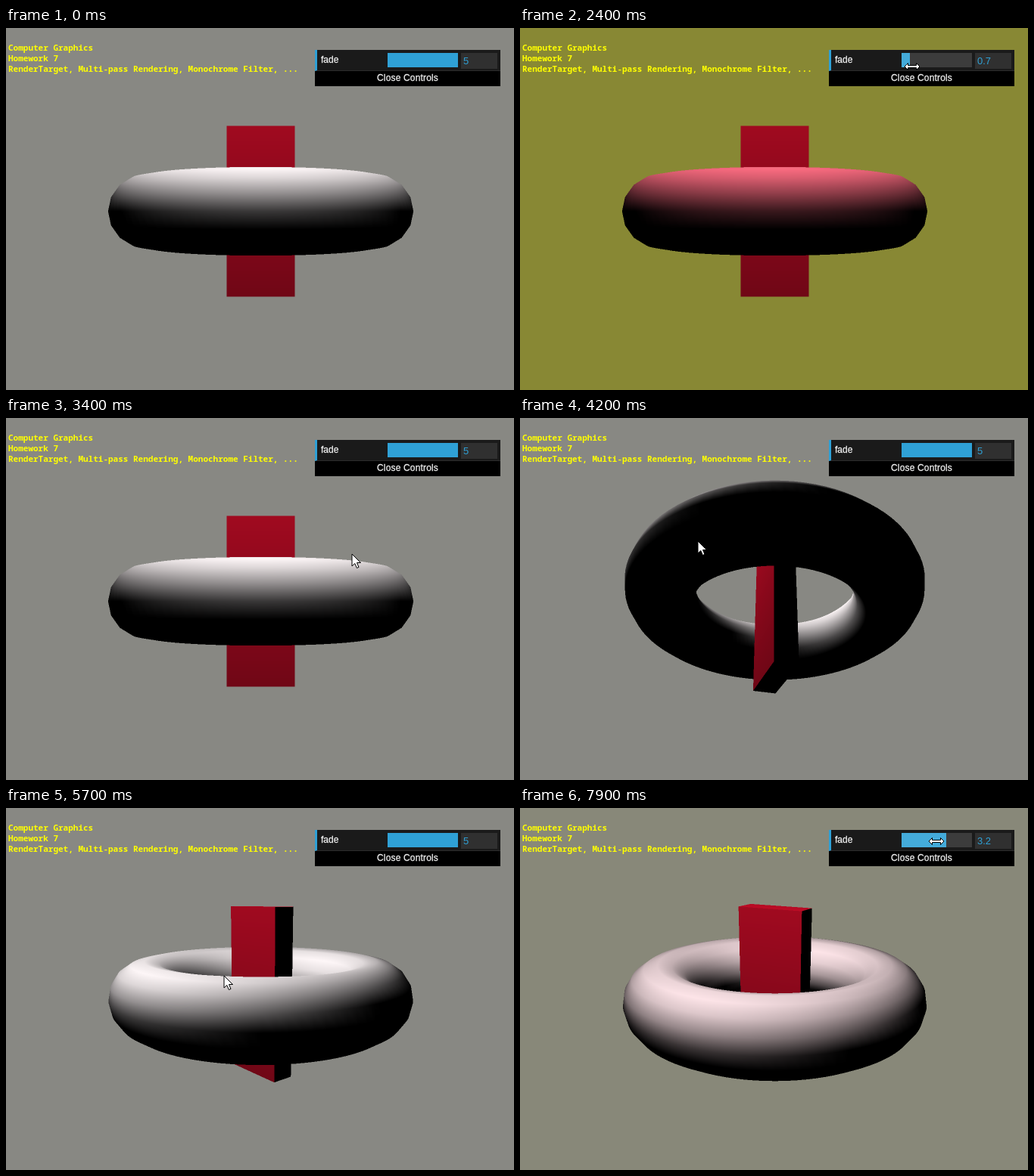
Animation, 671 px wide and 479 px high, one loop 8 s. Source, as an HTML page with a canvas:

```html
<!DOCTYPE html>
<html lang="en">
<head>
<meta charset="utf-8">
<title>Torus and box</title>
<style>
html, body { margin: 0; width: 100%; height: 100%; overflow: hidden; background: #888; }
#stage { position: relative; width: 671px; height: 479px; overflow: hidden; }
#stage * { position: absolute; box-sizing: border-box; }
#view { left: 0; top: 0; width: 671px; height: 479px; }
#info { left: 3px; top: 19px; margin: 0; color: #ff0; white-space: pre;
  font: 600 11px/14px "Noto Sans Mono", "DejaVu Sans Mono", monospace; }
#gui { left: 408px; top: 29px; width: 245px; height: 48px; background: #000; color: #eee;
  font: 12px/20px "Liberation Sans", Arial, sans-serif; -webkit-text-stroke: .3px; }
#row { left: 0; top: 0; width: 245px; height: 28px; background: #1a1a1a;
  border-left: 3px solid #2fa1d6; border-bottom: 1px solid #2c2c2c; }
#label { left: 5px; top: 3px; }
#slider { left: 93px; top: 4px; width: 93px; height: 19px; background: #303030; }
#fill { left: 0; top: 0; height: 19px; background: #2fa1d6; }
#slider.hover { background: #3c3c3c; }
.hover #fill { background: #44abda; }
#value { left: 190px; top: 4px; width: 48px; height: 21px; padding-left: 3px;
  background: #303030; color: #2fa1d6; font-size: 13px; line-height: 21px; -webkit-text-stroke: 0; }
#close { left: 0; top: 27px; width: 245px; text-align: center; letter-spacing: .17px; }
#mouse { left: 0; top: 0; width: 1px; height: 1px; overflow: visible; }
</style>
</head>
<body>
<div id="stage">
  <canvas id="view"></canvas>
  <pre id="info">Computer Graphics
Homework 7
RenderTarget, Multi-pass Rendering, Monochrome Filter, ...</pre>
  <div id="gui">
    <div id="row">
      <span id="label">fade</span>
      <div id="slider"><div id="fill"></div></div>
      <div id="value">5</div>
    </div>
    <div id="close">Close Controls</div>
  </div>
  <svg id="mouse" fill="#fff" stroke="#000">
    <path id="arrow" d="M0 0V16L3.8 12.5L6.4 18.5L9 17.4L6.5 11.5H11.5Z"/>
    <path id="resize" d="M-10 0L-5.5 -4.5V-1.5H5.5V-4.5L10 0L5.5 4.5V1.5H-5.5V4.5Z"/>
  </svg>
</div>
<script>
const SS = 2, W = 671 * SS, H = 479 * SS;
const CX = 336.5 * SS, CY = 242.5 * SS, FOCAL = 587 * SS, DIST = 40;
const LIGHT = [0, 30, 20], RED = [250, 16, 50];
const LOOP = 8000, STEP = 100;
const SLIDER = { x: 504, width: 93, min: .1, max: 5 };
const TURN = .43, TILT = .762; // degrees per dragged pixel

// The pointer drives everything: time, x, y
const path = [
  [100, 412, 106], [600, 638, 46], [900, 597, 42], [1800, 560, 43], [2000, 515.4, 51],
  [2300, 515.4, 51], [3200, 600, 50], [3400, 457, 180], [3600, 404, 207], [4100, 250, 151],
  [4200, 235, 163], [4900, 317, 261], [5200, 332, 268], [5700, 288, 222], [5900, 288, 241],
  [6300, 230, 189], [6600, 218, 202], [7000, 338, 250], [7100, 338, 250], [7500, 595, 44],
  [7900, 549.5, 44]
];
const slides = [[900, 3200], [7500, 7900]];
const orbits = [[3600, 5700], [5900, 7000]];

const $ = id => document.getElementById(id);
const clamp = (v, lo, hi) => Math.min(hi, Math.max(lo, v));
const mix = (a, b, k) => a + (b - a) * k;

const slope = (i, k) => (path[i + 1][k] - path[i][k]) / (path[i + 1][0] - path[i][0]);

// Harmonic mean of neighbouring slopes, zero at turning points
function tangent(i, k) {
  if (i === 0) return slope(0, k);
  if (i === path.length - 1) return slope(i - 1, k);
  const a = slope(i - 1, k), b = slope(i, k);
  return a * b > 0 ? 2 * a * b / (a + b) : 0;
}

// Monotone cubic through the path points
function pointer(t) {
  t = clamp(t, path[0][0], path[path.length - 1][0]);
  const i = Math.max(0, path.findIndex(p => p[0] >= t) - 1);
  const span = path[i + 1][0] - path[i][0], f = (t - path[i][0]) / span, g = 1 - f;
  return [1, 2].map(k =>
    mix(path[i][k], path[i + 1][k], f * f * (3 - 2 * f)) +
    span * f * g * (g * tangent(i, k) - f * tangent(i + 1, k)));
}

// The slider follows the pointer one step late
function fadeAt(t) {
  const drag = slides.filter(d => d[0] <= t).pop();
  if (!drag) return SLIDER.max;
  const f = (pointer(clamp(t - STEP, ...drag))[0] - SLIDER.x) / SLIDER.width;
  return Math.round(mix(SLIDER.min, SLIDER.max, clamp(f, 0, 1)) * 10) / 10;
}

function cameraAt(t) {
  let az = 0, el = 0;
  for (const [from, to] of orbits) {
    const a = pointer(from), b = pointer(clamp(t, from, to));
    az += (a[0] - b[0]) * TURN;
    el += (b[1] - a[1]) * TILT;
  }
  return [az, el].map(v => v * Math.PI / 180);
}

$('view').width = W;
$('view').height = H;
const ctx = $('view').getContext('2d');
const image = ctx.createImageData(W, H);
const pixels = new Uint32Array(image.data.buffer);
const depth = new Float32Array(W * H);
const pack = (r, g, b) => (255 << 24 | b << 16 | g << 8 | r) >>> 0;

// Lambert term of a point light
function lambert(p, n) {
  const l = LIGHT.map((v, k) => v - p[k]);
  return Math.max(0, (l[0] * n[0] + l[1] * n[1] + l[2] * n[2]) / Math.hypot(...l));
}

// Vertices are [x, y, z, light]
const vertex = (p, n) => [...p, lambert(p, n)];

function torus(R, r, rings, sides) {
  const verts = [], quads = [];
  for (let i = 0; i < rings; i++) for (let j = 0; j < sides; j++) {
    const u = i / rings * 2 * Math.PI, v = j / sides * 2 * Math.PI;
    const n = [Math.cos(v) * Math.cos(u), Math.sin(v), Math.cos(v) * Math.sin(u)];
    verts.push(vertex([R * Math.cos(u) + r * n[0], r * n[1], R * Math.sin(u) + r * n[2]], n));
    const i2 = (i + 1) % rings, j2 = (j + 1) % sides;
    quads.push([i * sides + j, i2 * sides + j, i2 * sides + j2, i * sides + j2]);
  }
  return { verts, quads };
}

function box(...size) {
  const verts = [], quads = [];
  for (let axis = 0; axis < 3; axis++) for (const side of [-1, 1]) {
    const first = verts.length;
    for (const [p, q] of [[-1, -1], [1, -1], [1, 1], [-1, 1]]) {
      const s = [0, 0, 0], n = [0, 0, 0];
      s[axis] = n[axis] = side;
      s[(axis + 1) % 3] = p;
      s[(axis + 2) % 3] = q;
      verts.push(vertex(s.map((v, k) => v * size[k] / 2), n));
    }
    quads.push([first, first + 1, first + 2, first + 3]);
  }
  return { verts, quads };
}

const ring = torus(10, 3, 100, 16), slab = box(6, 15, 2);

// Points are [x, y, 1/z, light/z]
function triangle(a, b, c, color) {
  const abx = b[0] - a[0], aby = b[1] - a[1], acx = c[0] - a[0], acy = c[1] - a[1];
  const area = abx * acy - aby * acx;
  if (!area) return;
  const x0 = Math.max(0, Math.floor(Math.min(a[0], b[0], c[0])));
  const x1 = Math.min(W - 1, Math.ceil(Math.max(a[0], b[0], c[0])));
  const y0 = Math.max(0, Math.floor(Math.min(a[1], b[1], c[1])));
  const y1 = Math.min(H - 1, Math.ceil(Math.max(a[1], b[1], c[1])));
  for (let y = y0; y <= y1; y++) for (let x = x0; x <= x1; x++) {
    const px = x + .5 - a[0], py = y + .5 - a[1];
    const v = (px * acy - py * acx) / area, w = (abx * py - aby * px) / area, u = 1 - v - w;
    if (u < 0 || v < 0 || w < 0) continue;
    const iz = u * a[2] + v * b[2] + w * c[2], at = y * W + x;
    if (iz <= depth[at]) continue;
    depth[at] = iz;
    const lit = (u * a[3] + v * b[3] + w * c[3]) / iz;
    pixels[at] = pack(color[0] * lit, color[1] * lit, color[2] * lit);
  }
}

function drawMesh(mesh, color, az, el) {
  const ca = Math.cos(az), sa = Math.sin(az), ce = Math.cos(el), se = Math.sin(el);
  const pts = mesh.verts.map(([px, py, pz, light]) => {
    const x = px * ca - pz * sa, z = px * sa + pz * ca;
    const iz = 1 / (DIST - py * se - z * ce);
    return [CX + FOCAL * x * iz, CY - FOCAL * (py * ce - z * se) * iz, iz, light * iz];
  });
  for (const [a, b, c, d] of mesh.quads) {
    triangle(pts[a], pts[b], pts[c], color);
    triangle(pts[a], pts[c], pts[d], color);
  }
}

function drawScene(t, fade) {
  const k = 1 - Math.exp(-.7 * fade), camera = cameraAt(t);
  pixels.fill(pack(136, 136, 136 * k));
  depth.fill(0);
  drawMesh(ring, RED.map(v => mix(v, 255, k)), ...camera);
  drawMesh(slab, RED, ...camera);
  ctx.putImageData(image, 0, 0);
}

function drawPanel(t, fade) {
  const [x, y] = pointer(t).map(Math.round);
  const { min, max, width } = SLIDER;
  const over = x >= SLIDER.x && x < SLIDER.x + width && y >= 33 && y < 52;
  const hover = t >= STEP && (over || slides.some(([from, to]) => t >= from && t <= to));
  $('fill').style.width = (fade - min) / (max - min) * width + 'px';
  $('value').textContent = fade;
  $('slider').className = hover ? 'hover' : '';
  $('mouse').style.display = t < STEP ? 'none' : '';
  $('mouse').style.transform = `translate(${x}px, ${y}px)`;
  $('arrow').style.display = hover ? 'none' : '';
  $('resize').style.display = hover ? '' : 'none';
}

let last = -1;
const start = performance.now();
function tick() {
  const t = Math.floor((performance.now() - start) % LOOP / STEP) * STEP;
  if (t !== last) {
    last = t;
    const fade = fadeAt(t);
    drawScene(t, fade);
    drawPanel(t, fade);
  }
  requestAnimationFrame(tick);
}
tick();
</script>
</body>
</html>
```
